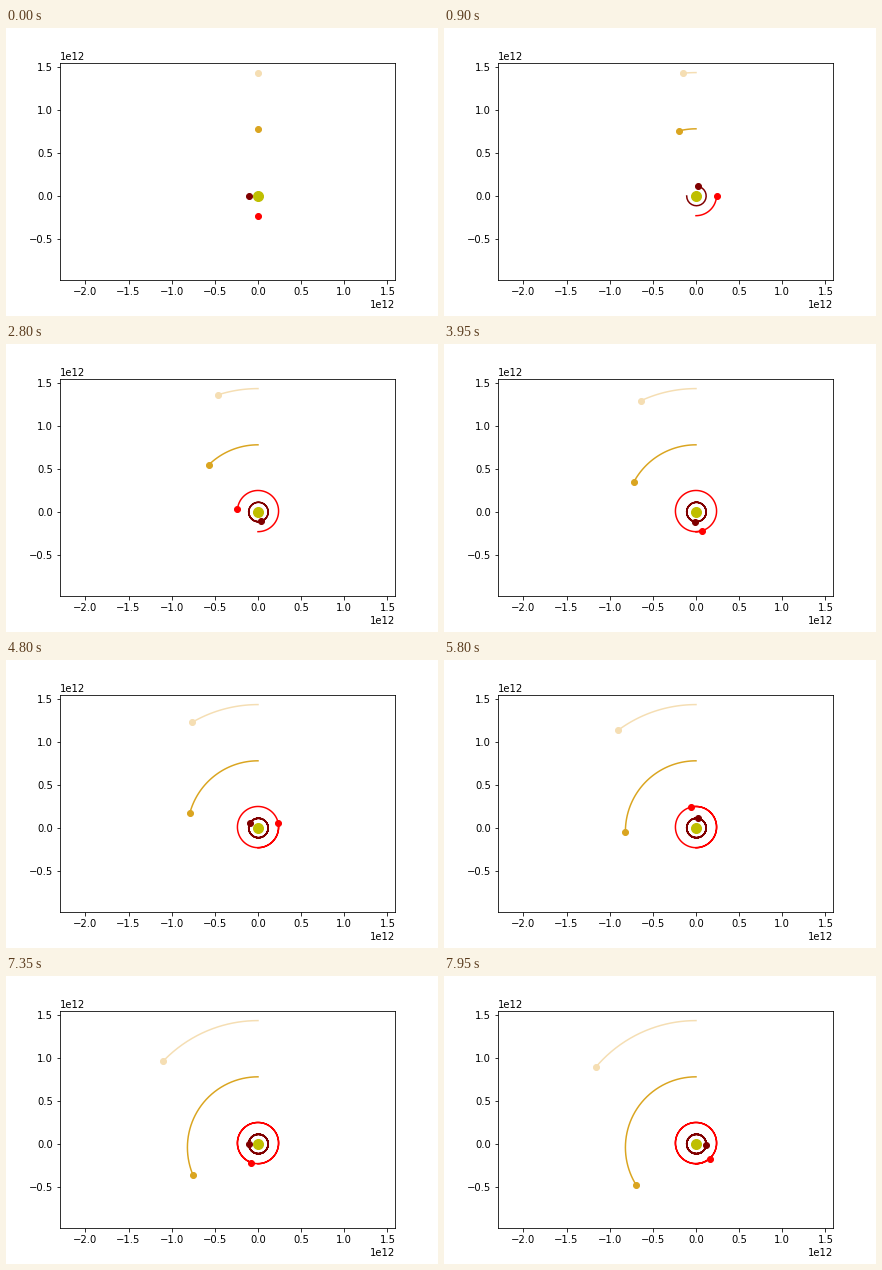
These frames come from a looping animation (432x288 px, 8000 ms). A matplotlib script:

```python
import numpy as np
import matplotlib.pyplot as plt
from matplotlib.animation import FuncAnimation

GM = 6.67e-11 * 1.9e30      # pull of the central star
STEP = 10 * 86400           # seconds of orbit per frame
FRAMES = 160

# start distance (m), start speed (m/s), start angle (deg), colour
PLANETS = [
    (1.080e11, 35000, 180, "maroon"),
    (2.280e11, 24100, -90, "red"),
    (7.785e11, 13070, 90, "goldenrod"),
    (1.430e12, 9700, 90, "wheat"),
]


def orbit(dist, speed, start):
    """Positions at every frame, counterclockwise from perihelion."""
    ecc = dist * speed**2 / GM - 1
    axis = dist / (1 - ecc)
    mean = np.sqrt(GM / axis**3) * STEP * np.arange(FRAMES)
    anom = mean.copy()
    for _ in range(30):
        anom = mean + ecc * np.sin(anom)
    along = axis * (np.cos(anom) - ecc)
    across = axis * np.sqrt(1 - ecc**2) * np.sin(anom)
    turn = np.radians(start)
    return (along * np.cos(turn) - across * np.sin(turn),
            along * np.sin(turn) + across * np.cos(turn))


plt.rcParams.update({"font.family": "DejaVu Sans", "font.size": 10})
fig = plt.figure(figsize=(6, 4), dpi=72, facecolor="white")
ax = fig.add_axes([0.125, 0.125, 0.775, 0.755])

scale = 86.3e-12            # pixels per metre
ax.set_xlim((54 - 252) / scale, (388.8 - 252) / scale)
ax.set_ylim((168 - 252) / scale, (168 - 34.56) / scale)
ax.set_xticks(np.arange(-4, 4) * 0.5e12)
ax.set_yticks(np.arange(-1, 4) * 0.5e12)

ax.plot([0], [0], "o", color="y", markersize=10)
bodies = []
for dist, speed, start, color in PLANETS:
    trail, = ax.plot([], [], color=color, lw=1.5)
    dot, = ax.plot([], [], "o", color=color, markersize=6)
    bodies.append((orbit(dist, speed, start), trail, dot))


def draw(i):
    artists = []
    for (x, y), trail, dot in bodies:
        trail.set_data(x[:i + 1], y[:i + 1])
        dot.set_data([x[i]], [y[i]])
        artists += [trail, dot]
    return artists


anim = FuncAnimation(fig, draw, frames=FRAMES, init_func=lambda: draw(0),
                     interval=50, repeat=True, repeat_delay=0, blit=False)
plt.show()
```
